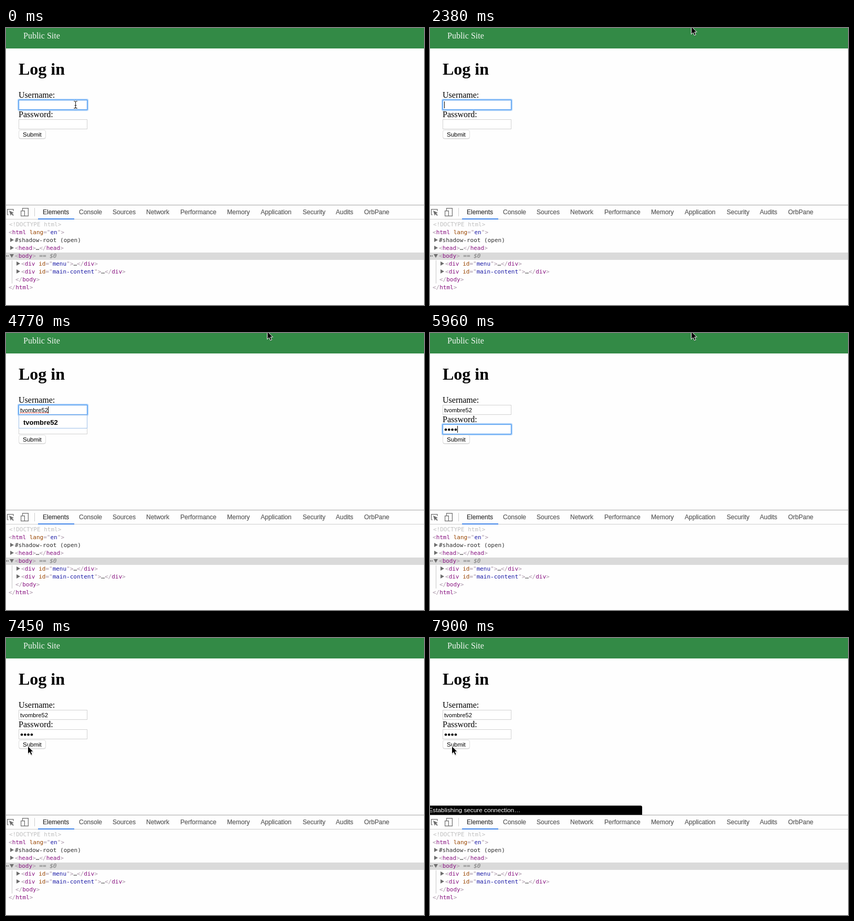
An HTML page that plays this animation: 796x528 px, repeating every 8000 ms.

```html
<!DOCTYPE html>
<html lang="en">
<head>
<meta charset="utf-8">
<title>Log in</title>
<style>
  html, body { margin: 0; width: 100%; height: 100%; overflow: hidden; background: #fefefe; }
  svg { display: block; }
  .serif { font: 16px "Liberation Serif", serif; }
  .sans { font: 11.2px "Liberation Sans", sans-serif; }
  .tabs { font: 12px "Liberation Sans", sans-serif; fill: #5a5a5a; stroke: #5a5a5a; stroke-width: .2; }
  .code { font: 11px "DejaVu Sans Mono", monospace; fill: #303030; }
  .punct { fill: #a894a6; }
  .tag { fill: #881280; }
  .attr { fill: #994500; }
  .value { fill: #1a1aa6; }
  .field { fill: #fff; stroke: #d2d2d2; }
  .icon { fill: none; stroke: #6e6e6e; stroke-width: 1.2; }
</style>
</head>
<body>
<svg width="796" height="528" viewBox="0 0 796 528">
  <rect width="796" height="528" fill="#fefefe"/>
  <rect width="796" height="39" fill="#338a46"/>
  <g class="serif">
    <text x="33" y="20" fill="#f4f8f4">Public Site</text>
    <text x="24" y="89" font-size="32" font-weight="bold" style="font-size:32px">Log in</text>
    <text x="24" y="133">Username:</text>
    <text x="24" y="170">Password:</text>
  </g>

  <rect class="field" x="24.5" y="137.5" width="130" height="18"/>
  <rect class="field" x="24.5" y="174.5" width="130" height="18"/>
  <g id="ring" fill="none" stroke="#5ea6f5">
    <rect x="23.5" y="136.5" width="132" height="20" rx="2" stroke-width="4" opacity=".3"/>
    <rect x="24" y="137" width="131" height="19" rx="1" stroke-width="2" opacity=".85"/>
  </g>

  <rect x="24.5" y="195.5" width="51" height="16" rx="3.5" fill="#c4c4c4"/>
  <rect x="24.5" y="194.5" width="51" height="16" rx="3.5" fill="#fff" stroke="#dedede"/>
  <text class="sans" x="32" y="207" style="font-size:11.5px">Submit</text>

  <text id="user" class="sans" x="27" y="151">tvombre52</text>
  <g id="suggest">
    <path d="M27 152.3H80" stroke="#e8473f" stroke-width="1.6" stroke-dasharray="2 1.4"/>
    <rect x="24.5" y="156.5" width="130" height="25" fill="#fff" stroke="#9dbfe8"/>
    <text class="sans" x="33" y="175" style="font-size:13px;font-weight:bold">tvombre52</text>
  </g>
  <g id="dots"></g>
  <rect id="caret" width="1" height="13"/>

  <g id="status">
    <path d="M0 319.5H401Q404 319.5 404 322.5V337H0Z" fill="#000"/>
    <text class="sans" x="-2.5" y="332" fill="#fff" style="font-size:11.8px">Establishing secure connection…</text>
  </g>

  <path d="M0 337.5H796" stroke="#a5a5a5"/>
  <path d="M0 364.5H796M54.5 343V359" stroke="#cdcdcd"/>
  <rect x="61" y="363" width="69" height="2" fill="#4285e8"/>
  <path class="icon" d="M5 356H2.6V345.6H14V349"/>
  <path d="M6 348L15 352.2L11.7 353.3L14.8 356.5L13.4 358L10.3 354.7L9 358Z" fill="#6e6e6e"/>
  <path class="icon" d="M31.5 348V343.6H42.4V358.4H36M28.6 348.6H35.4V358.4H28.6Z"/>
  <g id="tabs" class="tabs"></g>

  <rect y="428" width="796" height="14" fill="#dadada"/>
  <path d="M11.5 443V487" stroke="#c8c8c8"/>
  <path d="M0 434.5H2M3 434.5H5" stroke="#777" stroke-width="2"/>
  <path d="M8 400L15 404L8 408ZM8 415L15 419L8 423ZM7 431H15L11 438ZM20 445L27 449L20 453ZM20 460L27 464L20 468Z" fill="#6e6e6e"/>
  <g id="code" class="code"></g>

  <g id="beam" fill="none" stroke-linecap="round">
    <path d="M129.5 139.5Q132.5 139.5 132.5 141.5V151Q132.5 153 129.5 153M135.5 139.5Q132.5 139.5 132.5 141.5M132.5 151Q132.5 153 135.5 153M131 147.5H134" stroke="#222" stroke-width="1.1"/>
  </g>
  <g id="arrow">
    <path d="M.5 1.5V17L4 13.8L6.4 19L9 17.8L6.7 12.8H11.3Z" fill="#000" opacity=".18"/>
    <path d="M0 0V15L3.5 11.8L6 17.2L8.7 16L6.3 10.8H10.8Z" fill="#000" stroke="#fff"/>
  </g>
</svg>
<script>
const $ = id => document.getElementById(id);
const span = (cls, text) => `<tspan class="${cls}">${text}</tspan>`;

const highlight = line => line.replace(/([\w-]+)="([^"]*)"|(<\/?)(\w+)|>/g,
  (all, attr, value, open, tag) =>
    attr ? span('attr', attr) + span('punct', '="') + span('value', value) + span('punct', '"')
    : open ? span('punct', open.replace('<', '&lt;')) + span('tag', tag)
    : span('punct', '&gt;'));

const lines = [
  [5, '<html lang="en">'],
  [17, '#shadow-root (open)'],
  [17, '<head>…</head>'],
  [17, '<body>'],
  [29, '<div id="menu">…</div>'],
  [29, '<div id="main-content">…</div>'],
  [18, '</body>'],
  [5, '</html>']
];
$('code').innerHTML = '<text x="6" y="378" fill="#c0c0c0">&lt;!DOCTYPE html&gt;</text>' +
  '<text x="63.3" y="438" fill="#777">== <tspan font-style="italic">$0</tspan></text>' +
  lines.map(([x, s], i) => `<text x="${x}" y="${393 + 15 * i}">${highlight(s)}</text>`).join('');

const tabs = { Elements: 70, Console: 139, Sources: 203, Network: 267, Performance: 332, Memory: 421,
  Application: 485, Security: 565, Audits: 628, OrbPane: 682 };
$('tabs').innerHTML = Object.entries(tabs).map(([name, x], i) =>
  `<text x="${x}" y="355"${i ? '' : ' style="fill:#333;stroke:#333"'}>${name}</text>`).join('');

$('dots').innerHTML = [0, 1, 2, 3].map(i => `<circle cx="${30 + 6.3 * i}" cy="184.3" r="2.3"/>`).join('');

const caretOn = [[440, 890], [1490, 1930], [2380, 2980], [3430, 4320], [4770, 6410], [7000, 7450]];
const clamp = (v, max) => Math.max(0, Math.min(max, v));
const stepsSince = (t, start, gap, max) => clamp(Math.floor((t - start) / gap) + 1, max);
const show = (id, on) => $(id).style.display = on ? '' : 'none';

function render(t) {
  const inPassword = t >= 5070;
  const typed = stepsSince(t, 5520, 146.6, 4);

  show('user', t >= 3880);
  show('suggest', t >= 3880 && !inPassword);
  show('ring', t < 7450);
  $('ring').setAttribute('transform', `translate(0 ${inPassword ? 37 : 0})`);
  [...$('dots').children].forEach((dot, i) => dot.style.display = i < typed ? '' : 'none');

  show('caret', caretOn.some(([from, to]) => t >= from && t < to));
  $('caret').setAttribute('x', t < 3880 ? 27 : inPassword ? 27 + Math.round(6.3 * typed) : 80);
  $('caret').setAttribute('y', inPassword ? 177 : 140);

  show('beam', t < 740);
  show('arrow', t >= 740);
  const p = stepsSince(t, 6260, 148.5, 8) / 8;
  const eased = p * p * (3 - 2 * p);
  const [x, y] = t < 890 ? [330, 68] : [497.5 - 456 * eased, -3 + 209 * eased];
  $('arrow').setAttribute('transform', `translate(${x} ${y})`);

  $('status').setAttribute('opacity', t < 7750 ? 0 : t < 7900 ? .5 : 1);
}

function loop() {
  render(performance.now() % 8000);
  requestAnimationFrame(loop);
}
loop();
</script>
</body>
</html>
```
